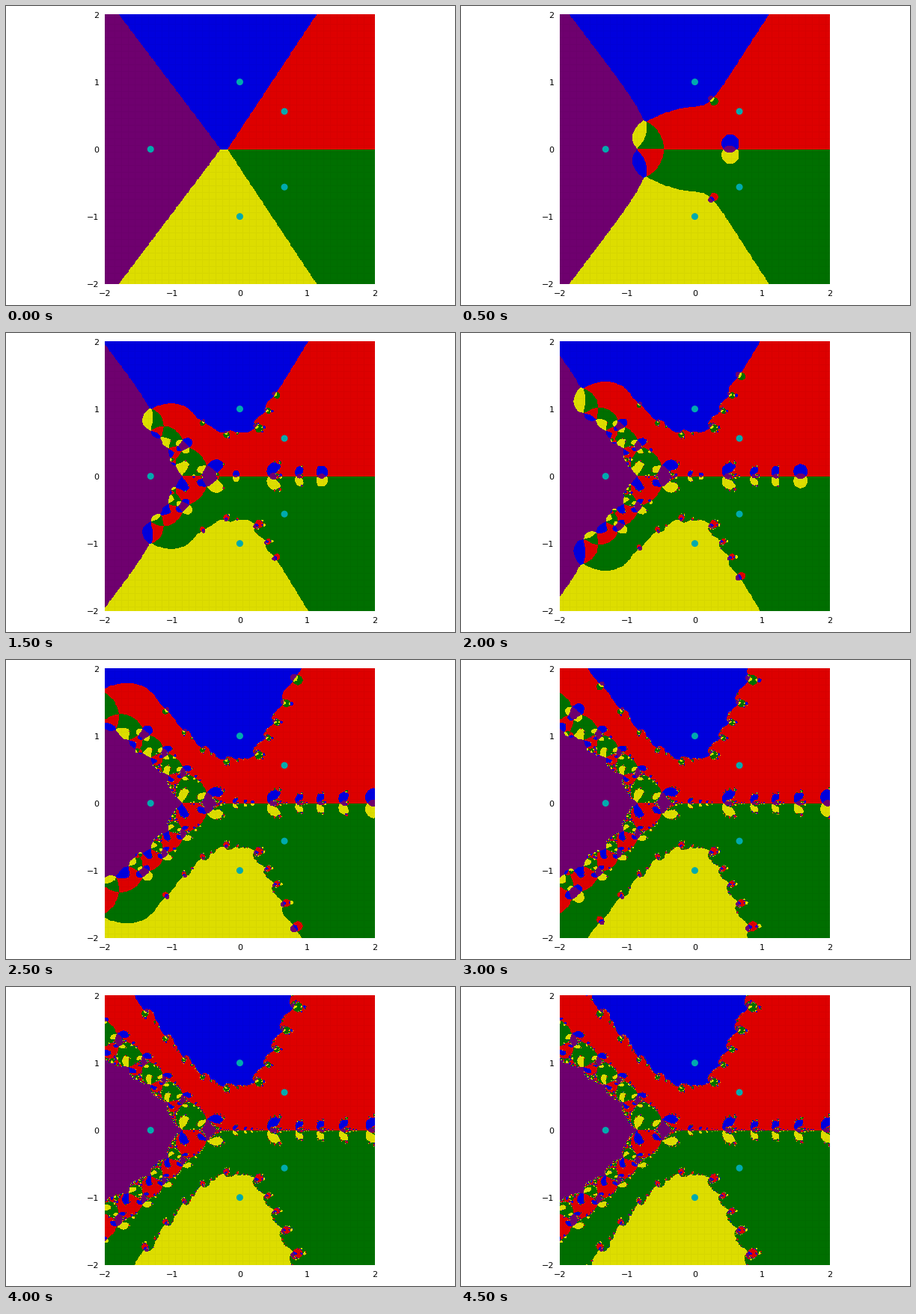
A matplotlib script that plays this animation: 600x400 px, repeating every 5000 ms.

```python
import numpy as np
import matplotlib.pyplot as plt
from matplotlib.animation import FuncAnimation
from matplotlib.patches import Circle

FRAMES, INTERVAL = 10, 500
LEFT, TOP, SIDE = 132, 11, 361
X0, Y0, UNIT = 312.45, 191.6, 90

# Roots of z^5 + z^2 - z + 1 = (z^2 + 1)(z^3 - z + 1)
cubic = np.roots([1, 0, -1, 1])
real_root = complex(cubic[np.argmin(cubic.real)].real, 0)
upper = complex(cubic[np.argmax(cubic.imag)])
ROOTS = [1j, upper, real_root, -1j, upper.conjugate()]
COLORS = np.array([(0, 0, 221), (221, 0, 0), (111, 0, 111),
                   (221, 221, 0), (0, 111, 0)], float) / 255


def newton(z):
    with np.errstate(all="ignore"):
        return z - (z**5 + z**2 - z + 1) / (5 * z**4 + 2 * z - 1)


def shade():
    """Faint mesh where two sample points share one pixel."""
    cols = np.floor(0.45 + 0.9 * np.arange(401)).astype(int)
    double = np.bincount(cols, minlength=SIDE)[:SIDE] > 1
    line = np.where(double, 0.97, 1.0)
    return np.minimum(line[:, None], line[None, :])[..., None]


def basins():
    # Samples lie 0.01 apart, each pixel takes the nearest one
    s = np.round((np.arange(SIDE) - SIDE // 2) / 0.9) / 100
    z = s[None, :] - 1j * s[:, None]
    mesh = shade()
    images = []
    for _ in range(FRAMES):
        dist = np.stack([np.abs(z - r) for r in ROOTS])
        images.append(COLORS[np.argmin(dist, axis=0)] * mesh)
        z = newton(z)
    return images


plt.rcParams["font.family"] = "DejaVu Sans"
fig = plt.figure(figsize=(6, 4), dpi=100, facecolor="white")
ax = fig.add_axes([0, 0, 1, 1])
ax.axis("off")

images = basins()
picture = ax.imshow(images[0], interpolation="nearest", aspect="auto",
                    extent=(LEFT, LEFT + SIDE, TOP + SIDE, TOP))
ax.set_xlim(0, 600)
ax.set_ylim(400, 0)

for r in ROOTS:
    ax.add_patch(Circle((X0 + UNIT * r.real, Y0 - UNIT * r.imag), 4.5,
                        facecolor="#00aaae", edgecolor="none", zorder=3))

for v in range(-2, 3):
    label = str(v).replace("-", "\u2212")
    ax.text(X0 + UNIT * v, 387.6, label, size=8, ha="center", va="baseline")
    ax.text(124.6, Y0 - UNIT * v + 4.2, label, size=8, ha="right",
            va="baseline")


def update(step):
    picture.set_data(images[step])
    return (picture,)


anim = FuncAnimation(fig, update, frames=FRAMES, interval=INTERVAL,
                     repeat=True, repeat_delay=0, blit=False)
plt.show()
```
